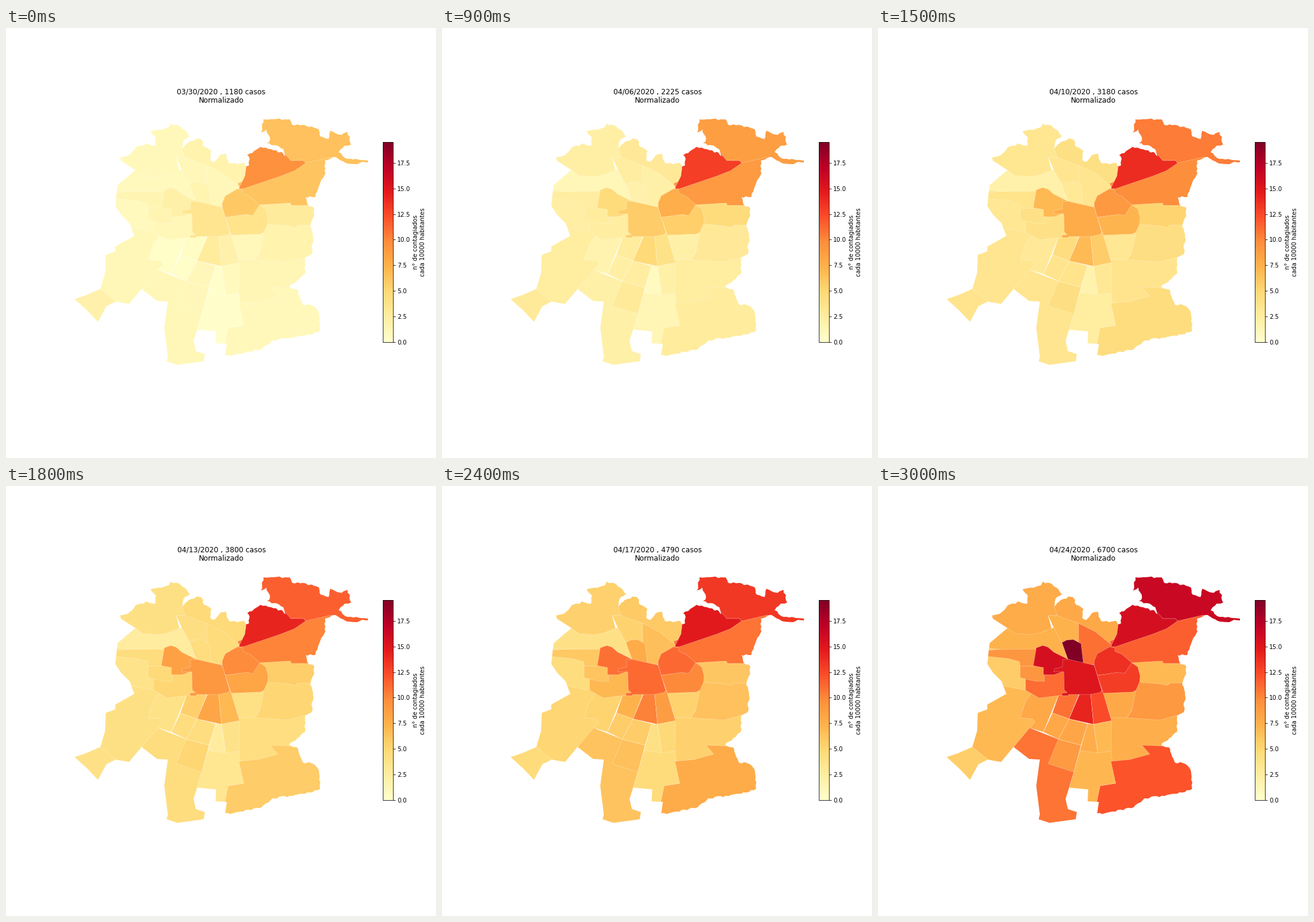
Recreate the animation shown at these times as a matplotlib script. Size 720 by 720 pixels, loop 4200 ms.

```python
import numpy as np
import matplotlib.pyplot as plt
from matplotlib.animation import FuncAnimation
from matplotlib.cm import ScalarMappable
from matplotlib.colors import Normalize
from matplotlib.patches import Polygon

plt.rcParams["font.family"] = "DejaVu Sans"

SIZE, DPI = 720, 72
STEP_MS, STEPS = 300, 14
REPORTS = [("03/30", 1180), ("04/01", 1434), ("04/03", 1742), ("04/06", 2225),
           ("04/08", 2548), ("04/10", 3180), ("04/13", 3800), ("04/15", 4228),
           ("04/17", 4790), ("04/20", 5597), ("04/24", 6700)]
FIRST, LAST = REPORTS[0][1], REPORTS[-1][1]

rng = np.random.default_rng(7)
scale = ScalarMappable(Normalize(0, 19.55), "YlOrRd")
fig = plt.figure(figsize=(SIZE / DPI, SIZE / DPI), dpi=DPI, facecolor="white")
ax = fig.add_axes([0, 0, 1, 1])
ax.set(xlim=(0, SIZE), ylim=(SIZE, 0))
ax.axis("off")


def points(*xy):
    return np.reshape(xy, (-1, 2)).astype(float)


def jagged(line, piece=4.5, depth=1.5):
    """Break a line into short pieces pushed sideways at random."""
    rough = []
    for start, end in zip(line[:-1], line[1:]):
        along = end - start
        length = np.hypot(*along)
        normal = np.array([-along[1], along[0]]) / length
        rough.append(start)
        for t in np.arange(piece, length - piece / 2, piece) / length:
            rough.append(start + t * along + rng.uniform(-depth, depth) * normal)
    return np.array(rough + [line[-1]])


# The outer rim, clockwise; hills in the north and east make it jagged.
west = points(115, 454, 135, 447, 158, 437, 166, 410, 167, 380, 183, 374,
              183, 366, 215, 348, 207, 327, 193, 313, 183, 298, 187, 263,
              217, 238, 186, 218)
north = points(204, 214, 217, 200, 237, 194, 250, 197, 251, 183, 242, 173,
               273, 166, 276, 160, 292, 165, 308, 181, 297, 189, 295, 202,
               303, 194, 325, 183, 332, 199, 344, 206, 342, 221, 349, 224,
               357, 214, 368, 210, 373, 226, 387, 228, 399, 226, 402, 232,
               407, 230, 408, 219, 404, 213, 426, 199, 463, 209, 468, 215)
northeast = points(464, 203, 458, 199, 437, 193, 442, 187, 436, 170, 427, 175,
                   431, 153, 475, 153, 479, 162, 512, 165, 524, 170, 527, 182,
                   540, 186, 543, 172, 562, 179, 572, 174, 578, 195, 567, 197,
                   557, 208, 568, 218, 592, 221)
spike = points(606, 222, 606, 225, 596, 224, 588, 228)
east = points(573, 227, 552, 216, 534, 222, 535, 243, 524, 265, 518, 283,
              502, 283, 505, 296, 516, 302, 516, 315, 510, 328, 514, 350,
              512, 379, 501, 384, 501, 411, 488, 422, 474, 433, 489, 440,
              497, 463, 511, 464, 523, 474, 526, 507, 502, 515, 446, 523,
              428, 538, 380, 548, 367, 548)
south = points(370, 529, 351, 528, 352, 508, 320, 505, 314, 524, 318, 541,
               333, 546, 331, 558, 287, 564, 269, 558, 271, 550, 265, 502,
               271, 458, 253, 457, 227, 437, 206, 462, 184, 458, 168, 466,
               154, 492, 136, 473)
rim = Polygon(np.vstack([west, jagged(north), jagged(northeast), spike,
                         jagged(east), south]), fill=False, linewidth=0)
ax.add_patch(rim)
communes = []


def commune(start, end, power, *xy):
    """Paint over earlier neighbours; the rate grows from start to end."""
    patch = Polygon(points(*xy), edgecolor="white", linewidth=0.25)
    ax.add_patch(patch)
    patch.set_clip_path(rim)
    communes.append((patch, start, end, power))


# North and east
commune(1.7, 7.9, 0.95, 290, 180, 410, 200, 402, 275, 300, 230)  # Huechuraba
commune(1.0, 7.8, 1.05, 175, 150, 320, 150, 310, 187, 299, 194, 295, 202,
        300, 217, 285, 217, 295, 255, 200, 255)  # Quilicura
commune(0.8, 7.4, 1.75, 217, 238, 229, 247, 255, 249, 271, 246, 294, 237,
        315, 262, 318, 295, 260, 290, 180, 285, 180, 260)  # Renca
commune(6.2, 11.6, 0.42, 388, 260, 500, 215, 620, 210, 560, 305, 400, 305)  # Las Condes
commune(6.4, 16.3, 0.88, 468, 215, 477, 222, 498, 222, 502, 226, 545, 216,
        590, 240, 640, 225, 590, 140, 410, 140, 420, 195, 464, 203)  # Lo Barnechea
commune(9.5, 15.6, 0.35, 388, 269, 398, 269, 460, 248, 483, 239, 502, 226,
        498, 222, 477, 222, 462, 205, 426, 192, 395, 205, 402, 233, 400, 248,
        391, 266)  # Vitacura
commune(1.3, 7.6, 1, 385, 380, 510, 380, 520, 440, 470, 470, 385, 465)  # La Florida
commune(1.7, 9.0, 1.05, 425, 325, 530, 325, 530, 381, 501, 384, 472, 392,
        417, 388, 425, 375)  # Penalolen
commune(2.7, 6.9, 0.5, 425, 296, 476, 293, 478, 297, 530, 297, 530, 330,
        489, 330, 485, 334, 470, 331, 430, 328)  # La Reina
commune(1.0, 7.9, 1.1, 375, 344, 432, 340, 430, 352, 425, 375, 417, 388,
        390, 388)  # Macul
commune(3.6, 13.0, 0.95, 367, 317, 413, 310, 425, 296, 435, 303, 439, 318,
        438, 328, 432, 342, 426, 345, 377, 347)  # Nunoa

# Centre and west
commune(1.1, 7.4, 0.95, 285, 217, 300, 217, 336, 230, 340, 265, 308, 262,
        294, 237)  # Conchali
commune(1.1, 10.9, 1.4, 336, 230, 364, 244, 391, 266, 388, 275, 362, 300,
        340, 297, 336, 261)  # Recoleta
commune(5.9, 13.6, 0.9, 362, 300, 362, 293, 367, 281, 388, 269, 396, 271,
        397, 277, 409, 282, 425, 296, 413, 314, 403, 312, 367, 317)  # Providencia
commune(1.6, 19.55, 2.5, 308, 262, 316, 258, 327, 257, 340, 264, 344, 298,
        318, 290)  # Independencia
commune(0.8, 5.7, 0.7, 175, 270, 250, 280, 250, 345, 175, 345)  # Pudahuel
commune(1.4, 9.2, 1.25, 180, 276, 197, 274, 270, 273, 262, 302, 238, 302,
        237, 294, 218, 289, 180, 285)  # Cerro Navia
commune(1.9, 5.6, 0.8, 150, 430, 200, 460, 150, 500, 105, 450)  # Padre Hurtado
commune(1.2, 6.9, 0.9, 195, 332, 247, 342, 265, 349, 265, 400, 227, 437,
        206, 470, 184, 458, 158, 437, 150, 350)  # Maipu
commune(0.3, 8.0, 1.05, 258, 346, 304, 346, 277, 412, 254, 405, 263, 395,
        259, 390, 238, 388, 247, 361)  # Cerrillos
commune(0.5, 10.8, 0.95, 304, 346, 338, 345, 320, 390, 292, 380)  # P. Aguirre Cerda
commune(1.2, 11.0, 1.25, 247, 318, 311, 305, 318, 349, 302, 351, 270, 355,
        247, 342)  # Estacion Central
commune(1.5, 9.2, 1.15, 238, 302, 277, 301, 279, 327, 264, 327, 238, 321)  # Lo Prado
commune(2.0, 15.6, 1, 265, 271, 276, 267, 285, 270, 294, 278, 318, 290,
        309, 311, 295, 316, 277, 316, 277, 304, 260, 301)  # Quinta Normal
commune(2.6, 14.2, 1, 338, 347, 356, 347, 361, 399, 320, 390)  # San Miguel
commune(1.9, 12.4, 1, 356, 347, 376, 343, 391, 393, 361, 399)  # San Joaquin
commune(3.4, 15.0, 0.97, 309, 291, 318, 290, 362, 300, 375, 343, 371, 346,
        356, 349, 319, 349, 319, 351, 308, 351, 308, 347, 317, 346, 312, 342,
        311, 311, 294, 311, 296, 306, 309, 303)  # Santiago

# South
commune(0.1, 7.1, 1.05, 338, 443, 390, 444, 398, 498, 372, 502, 372, 540,
        340, 540, 320, 505, 328, 479)  # La Pintana
commune(1.0, 12.0, 1.15, 390, 461, 422, 458, 455, 449, 442, 434, 540, 438,
        540, 560, 360, 560, 372, 502, 398, 498)  # Puente Alto
commune(1.2, 10.7, 1.45, 254, 405, 302, 424, 328, 479, 320, 505, 345, 545,
        330, 580, 250, 570, 250, 465, 227, 437)  # San Bernardo
commune(1.1, 8.9, 0.9, 302, 424, 340, 434, 328, 479, 285, 465)  # El Bosque
commune(0.3, 8.0, 0.85, 292, 380, 320, 390, 302, 424, 277, 412)  # Lo Espejo
commune(1.1, 8.1, 1, 320, 390, 351, 398, 340, 434, 302, 424)  # La Cisterna
commune(0.1, 7.7, 1.5, 351, 398, 361, 399, 368, 447, 338, 443)  # San Ramon
commune(0.8, 6.9, 0.95, 361, 399, 391, 393, 390, 444, 368, 447)  # La Granja

cax = fig.add_axes([631.26 / SIZE, 194.4 / SIZE, 16.74 / SIZE, 334.8 / SIZE])
fig.colorbar(scale, cax=cax, label="n° de contagiados\ncada 10000 habitantes")
title = ax.text(360.63, 125.3, "", fontsize=12, ha="center", va="baseline")


def update(step):
    date, cases = REPORTS[min(step, len(REPORTS) - 1)]
    spread = (cases - FIRST) / (LAST - FIRST)
    for patch, start, end, power in communes:
        patch.set_facecolor(scale.to_rgba(start + (end - start) * spread ** power))
    title.set_text(f"{date}/2020 , {cases} casos\nNormalizado")
    return [title, *(patch for patch, *_ in communes)]


anim = FuncAnimation(fig, update, frames=STEPS, interval=STEP_MS,
                     repeat=True, repeat_delay=0)
plt.show()
```
